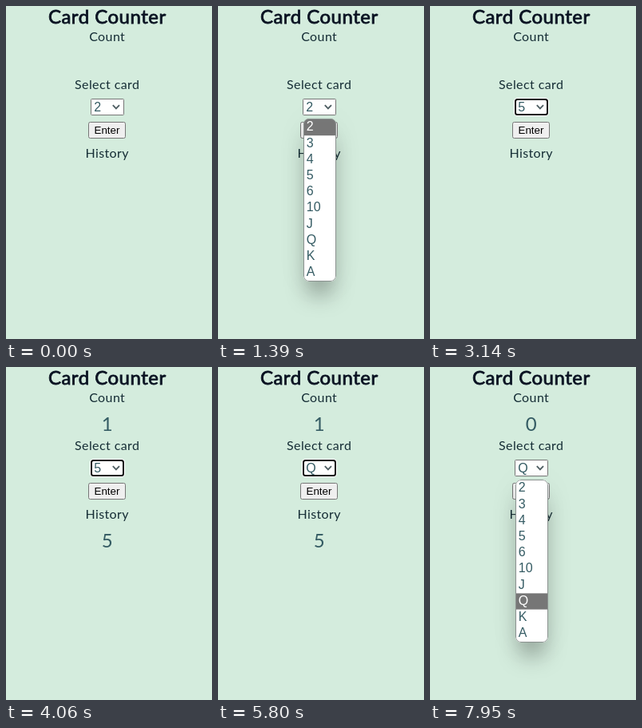
An HTML page for the animation above (8000 ms loop, 258 by 417 pixels).

```html
<!DOCTYPE html>
<html lang="en">
<head>
<meta charset="utf-8">
<title>Card Counter</title>
<style>
  html, body { margin: 0; width: 100%; height: 100%; overflow: hidden; background: #d4ecdd; }
  svg { position: absolute; left: 0; top: 0; display: block; }
  .label { font: 16px Lato, sans-serif; letter-spacing: .4px; fill: #152d35; text-anchor: middle; }
  .title {
    font: 24px Lato, sans-serif; letter-spacing: .5px; text-anchor: middle;
    fill: #0a1322; stroke: #0a1322; stroke-width: .8px;
  }
  .value { font: 24px Lato, sans-serif; fill: #345b63; }
  .option { font: 16px "Liberation Sans", Arial, sans-serif; fill: #345b63; }
  .button { font: 13.333px "Liberation Sans", Arial, sans-serif; text-anchor: middle; }
  .frame { stroke: #767676; }
  .ring .halo { stroke: #fff; }
  .ring .band { fill: none; stroke: #101010; stroke-width: 2; }
  #popup {
    position: absolute; left: 107px; top: 141px; width: 41px; height: 204px;
    box-sizing: border-box; border-radius: 7px; background: #fff;
    box-shadow: 0 22px 28px -6px rgba(0,0,0,.34), 0 4px 40px rgba(0,0,0,.05);
  }
  #popup svg { border-radius: 7px; }
</style>
</head>
<body>
<svg width="258" height="417">
  <text class="title" x="126.8" y="22">Card Counter</text>
  <text class="label" x="126.7" y="44">Count</text>
  <text class="label" x="126.7" y="104">Select card</text>
  <text class="label" x="126.7" y="190">History</text>

  <rect id="select" class="frame" x="106.5" y="116.5" width="41" height="20" rx="1" fill="#fff"/>
  <g id="selectRing" class="ring">
    <rect class="halo" x="105.5" y="115.5" width="43" height="22" rx="3.5" fill="#fff"/>
    <rect class="band" x="107" y="117" width="40" height="19" rx="2.5"/>
  </g>
  <text id="chosen" class="option" x="110.3" y="132"></text>
  <path d="M133.8 124.2l4.1 4.1 4.1-4.1" fill="none" stroke="#4f5f63" stroke-width="1.9"/>

  <rect class="frame" x="103.5" y="145.5" width="46" height="20" rx="2" fill="#efefef"/>
  <g id="enterRing" class="ring">
    <rect class="halo" x="102.5" y="144.5" width="48" height="22" rx="3.5" fill="#efefef"/>
    <rect class="band" x="104" y="146" width="45" height="19" rx="2.5"/>
  </g>
  <text class="button" x="126.5" y="160">Enter</text>

  <text id="count" class="value" x="126.6" y="80" text-anchor="middle"></text>
  <text id="first" class="value" y="226"></text>
  <text id="second" class="value" y="256"></text>
</svg>
<div id="popup">
  <svg width="41" height="204" viewBox="107 141 41 204">
    <rect id="mark" x="107" width="41" fill="#767676"/>
    <g id="rows"></g>
    <rect x="107.5" y="141.5" width="40" height="203" rx="6.5" fill="none" stroke="#8b9290"/>
  </svg>
</div>
<svg width="258" height="417">
  <path id="pointer" d="M.5.5v15.5l3.6-3.4 2.3 5.4 2.3-1-2.3-5.2h4.9z" fill="#fff" stroke="#000"/>
</svg>
<script>
const LOOP = 8000, ROW = 20.2, LIST_TOP = 142;
const CARDS = ["2", "3", "4", "5", "6", "10", "J", "Q", "K", "A"];
const el = id => document.getElementById(id);

// Each step changes only the listed parts of the state.
const START = { card: "2", open: 0, focus: "", hover: false, count: "", history: [] };
const STEPS = [
  [790, { hover: true }],
  [1050, { open: .6 }],
  [1120, { open: 1 }],
  [1320, { hover: false }],
  [2470, { card: "3" }],
  [2600, { card: "4" }],
  [2870, { card: "5" }],
  [3140, { open: 0, focus: "select" }],
  [3400, { focus: "enter" }],
  [3730, { count: "1", history: ["5"] }],
  [4060, { focus: "select" }],
  [4790, { open: 1, focus: "" }],
  [5120, { card: "6" }],
  [5270, { card: "10" }],
  [5400, { card: "J" }],
  [5600, { card: "Q" }],
  [5800, { open: 0, focus: "select" }],
  [6210, { focus: "enter" }],
  [6410, { count: "0", history: ["5", "Q"] }],
  [6810, { focus: "select" }],
  [7470, { open: 1, focus: "" }],
  [7620, { card: "K" }],
  [7950, { card: "Q" }]
];

// The pointer crosses the page in hops, then leaves once the list is open.
const POINTER = { from: 130, to: 790, gone: 1320, hops: 10 };
const PATH = [[219, 355], [196, 248], [200, 217], [131, 117]];

const rows = CARDS.map((card, i) => {
  const row = document.createElementNS("http://www.w3.org/2000/svg", "text");
  row.textContent = card;
  row.setAttribute("class", "option");
  row.setAttribute("x", 110.8);
  row.setAttribute("y", LIST_TOP + i * ROW + 14.4);
  el("rows").append(row);
  return row;
});

function stateAt(time) {
  const past = STEPS.filter(([at]) => at <= time).map(([, change]) => change);
  return Object.assign({}, START, ...past);
}

function drawPointer(time) {
  const { from, to, gone, hops } = POINTER;
  const shown = time >= from && time < gone;
  el("pointer").style.display = shown ? "" : "none";
  if (!shown) return;
  const hop = Math.min(hops, Math.floor((time - from) / (to - from) * hops));
  const along = hop / hops * (PATH.length - 1);
  const i = Math.min(PATH.length - 2, Math.floor(along));
  const [x, y] = PATH[i].map((v, k) => v + (PATH[i + 1][k] - v) * (along - i));
  el("pointer").setAttribute("transform", `translate(${Math.round(x)} ${Math.round(y)})`);
}

function draw(time) {
  const s = stateAt(time);
  const index = CARDS.indexOf(s.card);
  const top = index ? LIST_TOP + index * ROW : 141;

  el("chosen").textContent = s.card;
  el("select").style.stroke = s.hover ? "#4f4f4f" : "";
  el("selectRing").style.display = s.focus === "select" ? "" : "none";
  el("enterRing").style.display = s.focus === "enter" ? "" : "none";
  el("count").textContent = s.count;

  const [first = "", second = ""] = s.history;
  const left = second ? 117.6 : 119.7;
  el("first").setAttribute("x", left);
  el("second").setAttribute("x", left);
  el("first").textContent = first;
  el("second").textContent = second;

  el("popup").style.opacity = s.open;
  el("mark").setAttribute("y", top);
  el("mark").setAttribute("height", LIST_TOP + (index + 1) * ROW - top);
  rows.forEach((row, i) => row.style.fill = i === index ? "#fff" : "");

  drawPointer(time);
}

const begin = performance.now();
function tick() {
  draw((performance.now() - begin) % LOOP);
  requestAnimationFrame(tick);
}
tick();
</script>
</body>
</html>
```
